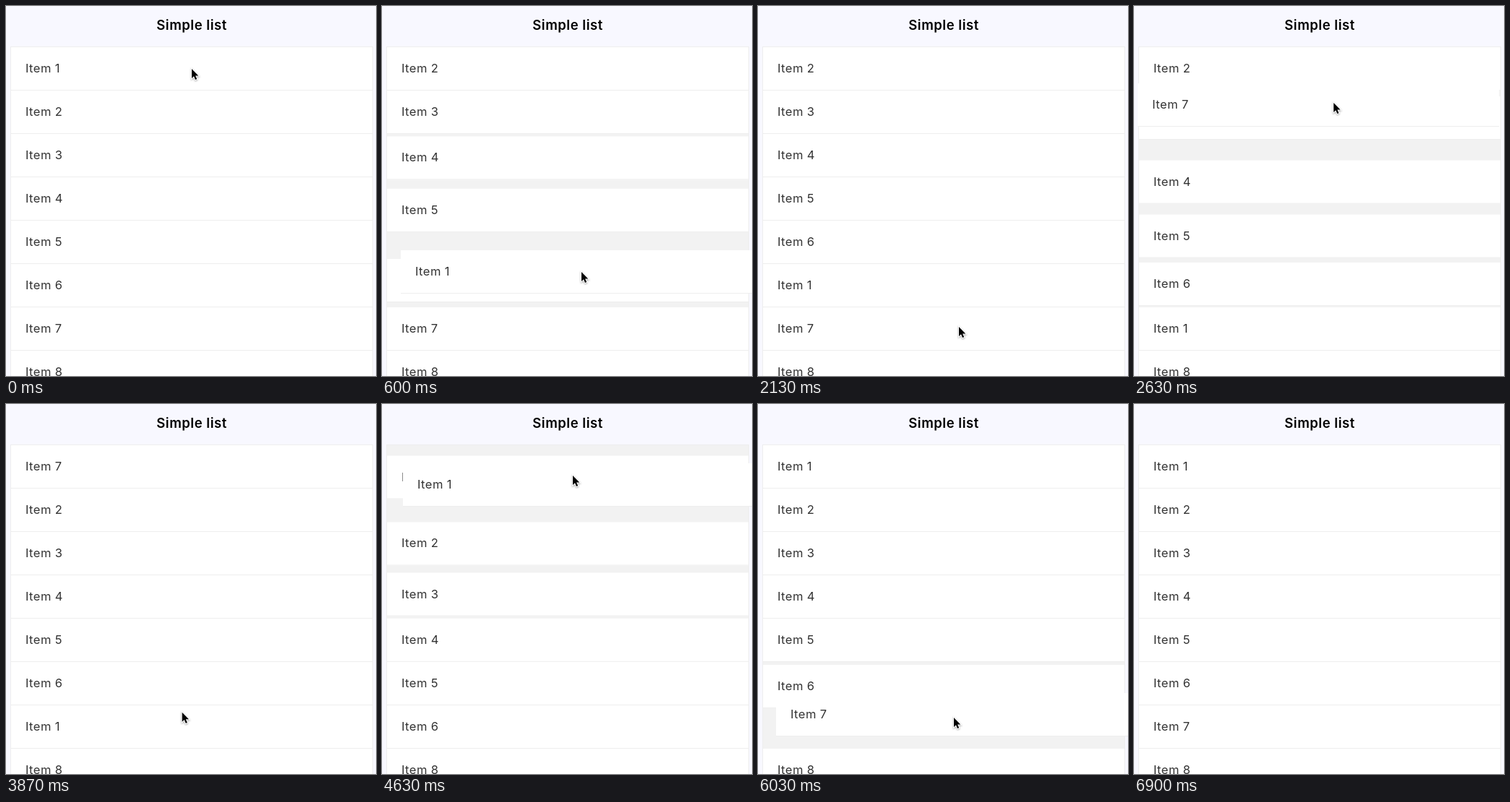
An HTML page that plays this animation: 512 px wide and 512 px high, repeating every 6.93 s.

```html
<!DOCTYPE html>
<html lang="en">
<head>
<meta charset="utf-8">
<title>Simple list</title>
<style>
html, body { margin: 0; width: 100%; height: 100%; overflow: hidden; background: #f8f8ff; }
body { position: relative; font: 16.5px Inter, sans-serif; color: #333; }
h1 { position: absolute; left: 1px; top: 14px; width: 512px; margin: 0; text-align: center;
  font: 600 18.5px/24px Inter, sans-serif; letter-spacing: .5px; color: #000; }
#list { position: absolute; left: 6px; top: 56px; width: 500px; height: 480px;
  border: 1px solid #eee; background: #f2f2f2; }
.row { position: absolute; left: 0; top: 0; width: 480px; height: 59px; padding-left: 20px;
  line-height: 59px; letter-spacing: .45px; background: #fff; border-bottom: 1px solid #eee; }
#cursor { position: absolute; left: -4px; top: -3px; z-index: 3; overflow: visible;
  filter: drop-shadow(0 1px 1px rgba(0, 0, 0, .35)); }
</style>
</head>
<body>
<h1>Simple list</h1>
<div id="list"></div>
<svg id="cursor" width="20" height="26" viewBox="-4 -4 20 26">
  <path d="M0 0V13L3 10.2L5 15L7.2 14.1L5.1 9.4H9.3Z" stroke="#fff" stroke-width="2" paint-order="stroke"/>
</svg>
<script>
const LOOP = 6930, ROW = 60, SLIDE = 300, LAG = 15, HIDE = 6640;
const list = document.getElementById('list');
const cursor = document.getElementById('cursor');
const clamp = v => Math.min(1, Math.max(0, v));
const mix = (a, b, k) => a + (b - a) * k;

// Pointer moves: begin, end, x, y
const home = { x: 257, y: 86 };
const moves = [
  [200, 580, 276, 367],
  [1420, 1700, 281, 484],
  [1870, 2130, 278, 443],
  [2300, 2708, 276, 89],
  [3020, 3600, 248, 408],
  [3700, 3970, 242, 433],
  [4200, 4575, 264, 98],
  [4950, 5400, 253, 150],
  [5525, 5570, 271, 238],
  [5570, 5840, 271, 433],
  [6400, 6630, 275, 390]
];

const drags = [
  { from: 0, to: 5, start: 200, drop: 1200 },
  { from: 6, to: 0, start: 2300, drop: 3000 },
  { from: 6, to: 0, start: 4200, drop: 4900 },
  { from: 1, to: 6, start: 5525, drop: 6370 }
];

// Nearly steady hand that slows a little at the end
const glide = u => 1 - (1 - clamp(u)) ** 1.25;

function pointer(t) {
  let { x, y } = home;
  for (const [begin, end, toX, toY] of moves) {
    const k = glide((t - begin) / (end - begin));
    x = mix(x, toX, k);
    y = mix(y, toY, k);
  }
  return { x, y };
}

// CSS "ease": cubic-bezier(.25, .1, .25, 1)
function ease(u) {
  const target = clamp(u);
  const curve = (s, a, b) => 3 * (1 - s) * s * ((1 - s) * a + s * b) + s ** 3;
  let lo = 0, hi = 1;
  for (let n = 0; n < 20; n++) {
    const mid = (lo + hi) / 2;
    if (curve(mid, .25, .25) < target) lo = mid; else hi = mid;
  }
  return curve(lo, .1, 1);
}

// A neighbour gives way once the dragged row covers half of it
for (const d of drags) {
  d.dir = Math.sign(d.to - d.from);
  d.grab = pointer(d.start);
  d.passed = [];
  let t = d.start;
  for (let n = 1; n <= Math.abs(d.to - d.from); n++) {
    while (t < d.drop && d.dir * (pointer(t).y - d.grab.y) < ROW * (n - .5)) t++;
    d.passed[d.from + n * d.dir] = t + LAG;
  }
}

const rows = Array.from({ length: 8 }, (_, i) => {
  const row = list.appendChild(document.createElement('div'));
  row.className = 'row';
  row.textContent = 'Item ' + (i + 1);
  return row;
});

function place(element, x, y, z) {
  element.style.transform = `translate(${x}px, ${y}px)`;
  element.style.zIndex = z;
}

function draw(t) {
  const order = [...rows];
  let active = null;
  for (const d of drags) {
    if (t < d.start) break;
    if (t < d.drop + SLIDE) { active = d; break; }
    order.splice(d.to, 0, order.splice(d.from, 1)[0]);
  }
  order.forEach((row, i) => {
    const since = active && active.passed[i];
    const shift = since ? active.dir * ease((t - since) / SLIDE) : 0;
    place(row, 0, ROW * (i - shift), 0);
  });
  if (active) {
    const { from, to, drop, grab } = active;
    const held = pointer(Math.min(t, drop));
    const settled = ease((t - drop) / SLIDE);
    place(order[from], mix(held.x - grab.x, 0, settled),
      mix(ROW * from + held.y - grab.y, ROW * to, settled), 2);
  }
  const { x, y } = pointer(t);
  place(cursor, x, y, 3);
  cursor.style.visibility = t < HIDE ? 'visible' : 'hidden';
}

const begin = performance.now();
function frame() {
  draw((performance.now() - begin) % LOOP);
  requestAnimationFrame(frame);
}
frame();
</script>
</body>
</html>
```
